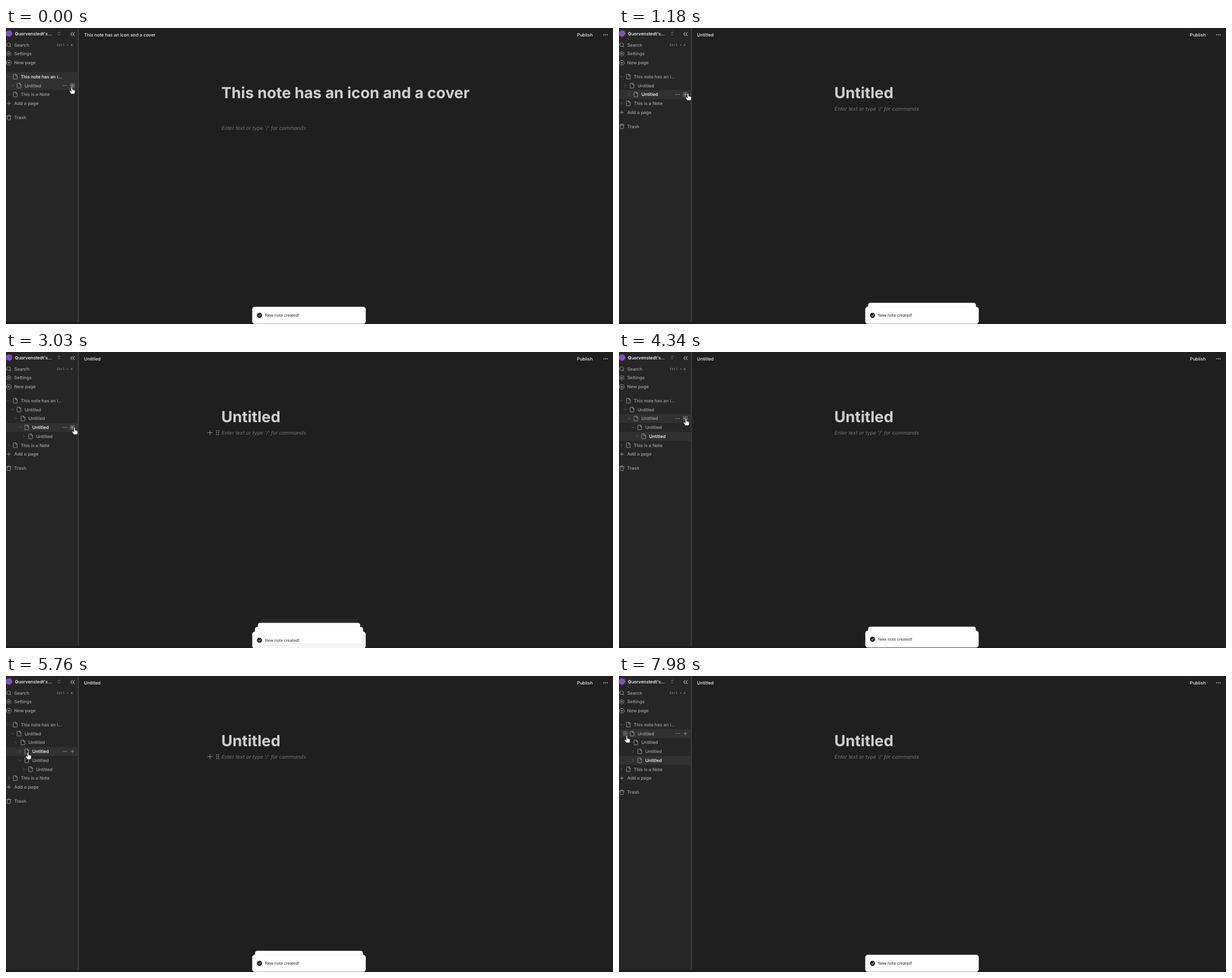
Animation of 1070x523 px, one loop 8000 ms. Source, as an HTML page:

```html
<!DOCTYPE html>
<html lang="en">
<head>
<meta charset="utf-8">
<title>Nested notes</title>
<style>
html, body { margin: 0; width: 100%; height: 100%; overflow: hidden; background: #1f1f1f; }
svg { display: block; width: 1070px; height: 523px; }
text { font: 500 7.875px Inter, sans-serif; font-optical-sizing: none; text-rendering: geometricPrecision; white-space: pre; }
.title { font-size: 27px; font-weight: 700; }
.hint { font-size: 9px; font-weight: 400; font-style: italic; }
.toast { font: 400 7.05px "Noto Sans", sans-serif; }
.key { font: 500 5.9px "Liberation Mono", monospace; }
</style>
</head>
<body>
<svg id="stage" viewBox="0 0 1070 523"></svg>
<script>
const LOOP = 8000, ROW = 15.75, INDENT = 6.75;
const DIM = '#a3a3a3', LIT = '#fff', FAINT = '#6e6e6e';
const NOTE = 'This note has an icon and a cover';

// Times at which the tree changes
const ADD_SECOND = 390, ADD_THIRD = 1930, ADD_FOURTH = 2990, ADD_SIBLING = 4620, COLLAPSE = 7050;

// start, page, title back, hint back
const visits = [
  [0, 'root', 0, 0],
  [650, 'second', 750, 1000],
  [2080, 'third', 2170, 2390],
  [3100, 'fourth', 3190, 3570],
  [4700, 'sibling', 4790, 5120],
  [6370, 'third', 6480, 6480]
];

// start, end
const toasts = [[-500, 3600], [90, 3950], [1640, 5530], [2740, 6800], [4320, 9000]];

// time, x, y of the fingertip
const pointer = [
  [0, 116, 104], [1000, 116, 104], [1180, 121.6, 115.5], [1430, 118.5, 116],
  [2130, 118.5, 116], [2380, 120.6, 133.3], [3570, 120.6, 133.3], [4100, 118, 117.3],
  [5520, 118, 117.3], [5760, 38.8, 134.5], [6180, 50, 147], [6730, 50, 147],
  [7020, 25, 148], [7620, 25, 148], [7980, 13.8, 105.5], [8000, 13.8, 105.5]
];

// Spans in which the block handle shows beside the editor line
const handles = [[2500, 3100], [5620, 6370], [6780, 7720]];

const gear = Array.from({ length: 60 }, (_, i) => {
  const a = i * Math.PI / 30, r = 8.7 + 1.2 * Math.cos(6 * a);
  return (12 + r * Math.sin(a)).toFixed(2) + ' ' + (12 - r * Math.cos(a)).toFixed(2);
}).join('L');

const ring = (x, y, r) => `M${x - r} ${y}a${r} ${r} 0 1 0 ${2 * r} 0a${r} ${r} 0 1 0 ${-2 * r} 0`;

// Outlines on a 24 unit grid
const icons = {
  file: 'M14.5 2H6a2 2 0 0 0-2 2v16a2 2 0 0 0 2 2h12a2 2 0 0 0 2-2V7.5zM14 2v6h6',
  search: ring(11, 11, 8) + 'M21 21l-4.3-4.3',
  gear: `M${gear}z` + ring(12, 12, 3),
  newPage: ring(12, 12, 10) + 'M8 12h8M12 8v8',
  plus: 'M5 12h14M12 5v14',
  trash: 'M3 6h18M19 6v14q0 2-2 2H7q-2 0-2-2V6M8 6V4q0-2 2-2h4q2 0 2 2v2',
  right: 'M9 18l6-6-6-6',
  down: 'M6 9l6 6 6-6',
  upDown: 'M7 15l5 5 5-5M7 9l5-5 5 5',
  back: 'M11 17l-5-5 5-5M18 17l-5-5 5-5',
  more: [5, 12, 19].map(x => ring(x, 12, 1)).join('')
};

const icon = (name, x, y, size = 10.125, color = DIM) =>
  `<path d="${icons[name]}" transform="translate(${x - size / 2} ${y - size / 2}) scale(${size / 24})" ` +
  `fill="none" stroke="${color}" stroke-width="2" stroke-linecap="round" stroke-linejoin="round"/>`;

const rect = (x, y, w, h, fill, r = 0) =>
  `<rect x="${x}" y="${y}" width="${w}" height="${h}" rx="${r}" fill="${fill}"/>`;

const text = (str, x, y, color = DIM, cls = '') =>
  `<text x="${x}" y="${y}" fill="${color}" class="${cls}">${str}</text>`;

const clamp = v => Math.min(1, Math.max(0, v));

// cubic-bezier(.25, .1, .25, 1)
function ease(p) {
  if (p <= 0 || p >= 1) return clamp(p);
  let lo = 0, hi = 1, s;
  for (let i = 0; i < 18; i++) {
    s = (lo + hi) / 2;
    const x = .75 * s * (1 - s) + s ** 3;
    if (x < p) lo = s; else hi = s;
  }
  return .3 * s * (1 - s) ** 2 + 3 * s * s * (1 - s) + s ** 3;
}

function pointerAt(t) {
  const i = pointer.findIndex(k => k[0] > t);
  const [t0, x0, y0] = pointer[i - 1], [t1, x1, y1] = pointer[i];
  const p = (t - t0) / (t1 - t0), s = p * (2 - p);
  return [x0 + (x1 - x0) * s, y0 + (y1 - y0) * s];
}

// Visible tree rows: id, level, label, open
function treeAt(t) {
  const fourth = t >= ADD_FOURTH && t < COLLAPSE;
  return [
    ['root', 0, 'This note has an i…', true],
    ['first', 1, 'Untitled', t >= ADD_SECOND],
    t >= ADD_SECOND && ['second', 2, 'Untitled', t >= ADD_THIRD],
    t >= ADD_SIBLING && ['sibling', 3, 'Untitled', false],
    t >= ADD_THIRD && ['third', 3, 'Untitled', fourth],
    fourth && ['fourth', 4, 'Untitled', false],
    ['other', 0, 'This is a Note', false]
  ].filter(Boolean);
}

function treeRow([id, level, label, open], y, active, [px, py]) {
  const dx = level * INDENT, arrowX = 4.5 + dx;
  const on = id === active, hover = Math.abs(py - y) <= ROW / 2;
  const button = x => hover && Math.abs(px - x) < 5 ? rect(x - 4.5, y - 4.5, 9, 9, '#525252', 1.5) : '';
  let out = on || hover ? rect(0, y - ROW / 2, 126.5, ROW, '#313131') : '';
  out += button(arrowX) + icon(open ? 'down' : 'right', arrowX, y, 9, FAINT);
  out += icon('file', 16.3 + dx, y) + text(label, 25.9 + dx, y + 2.86, on ? LIT : DIM);
  if (hover) out += icon('more', 103.5, y, 9.6) + button(117) + icon('plus', 117, y, 9);
  return out;
}

function sidebar(t, active, tip) {
  let out = rect(0, 0, 128.5, 523, '#262626');
  out += '<circle cx="5.4" cy="9.8" r="5.7" fill="#7d50bd"/>';
  out += text('Quorvenstedt\'s…', 15.6, 12.6, LIT);
  out += icon('upDown', 93.7, 9.8, 9) + icon('back', 117.3, 10.8, 13.5);
  [['search', 'Search', 30], ['gear', 'Settings', 45.6], ['newPage', 'New page', 61.4]]
    .forEach(([name, label, y]) => out += icon(name, 5, y) + text(label, 14.5, y + 2.86));
  out += text('Ctrl + K', 89.4, 32, DIM, 'key');
  let y = 86;
  for (const row of treeAt(t)) {
    out += treeRow(row, y, active, tip);
    y += ROW;
  }
  out += icon('plus', 5, y) + text('Add a page', 14.5, y + 2.86);
  out += icon('trash', 5, y + 24.75) + text('Trash', 14.5, y + 27.6);
  return out + rect(126.4, 0, 2.2, 523, '#3b3b3b');
}

function page(t, [start, id, titleAt, hintAt]) {
  if (t < titleAt) return '';
  const root = id === 'root', name = root ? NOTE : 'Untitled';
  let out = text(name, 137.6, 14.8, '#f0f0f0') + text('Publish', 1006.6, 14.8, '#f0f0f0');
  out += icon('more', 1057, 12, 10.125, '#f0f0f0');
  out += text(name, 379.5, 124.2, '#cfcfcf', 'title');
  if (t >= hintAt) out += text("Enter text or type '/' for commands", 380, root ? 179.6 : 145.9, '#747474', 'hint');
  if (handles.some(([a, b]) => t >= a && t < b)) {
    out += '<path d="M355 142.5h9M359.5 138v9" stroke="#8c8c8c" fill="none"/>';
    for (let i = 0; i < 6; i++)
      out += `<circle cx="${371.3 + i % 2 * 3.4}" cy="${139.3 + (i >> 1) * 3.2}" r="1" fill="#8c8c8c"/>`;
  }
  return out;
}

function toastStack(t) {
  return toasts.map(([start, end], i) => {
    const shown = ease((t - start) / 400);
    const depth = toasts.slice(i + 1).reduce((sum, next) => sum + ease((t - next[0]) / 400), 0);
    const alpha = shown * (1 - ease((t - end) / 220)) * clamp(3 - depth);
    if (alpha <= 0) return '';
    const y = 507.6 + 30 * (1 - shown) - 7.875 * depth;
    return `<g opacity="${alpha}" transform="translate(534.1 ${y}) scale(${1 - .05 * depth})">
      <rect x="-99.9" y="-14.8" width="199.8" height="29.6" rx="4.3" fill="#fff" stroke="#f0f0f0" stroke-width=".4"/>
      <g opacity="${clamp(1 - depth)}"><circle cx="-87.3" cy=".2" r="4.5" fill="#171717"/>
      <path d="M-89.2 .4l1.4 1.5 2.5-3.4" fill="none" stroke="#fff" stroke-width=".9"/>
      ${text('New note created!', -77.6, 2.8, '#171717', 'toast')}</g></g>`;
  }).join('');
}

const hand = ([x, y]) => `<g transform="translate(${x} ${y})" stroke="#161616" stroke-linejoin="round">
  <path d="M-1.1 1.1a1.1 1.1 0 0 1 2.2 0V4.6q1.1-.6 1.7 .4 1.2-.4 1.7 .5 1.3-.2 1.3 1.1V9q0 2-1.2 3.6H-1.2Q-2.5 10.4-4 8.2q-.6-1.1 .4-1.5 1-.3 1.8 .6l.7 .8z" fill="#fff" stroke-width=".7"/>
  <path d="M1.1 7V4.6M2.8 7.2V5M4.5 7.4V5.5" fill="none" stroke-width=".4"/></g>`;

const stage = document.getElementById('stage');
const begin = performance.now();
let last = '';

function draw() {
  const t = Math.max(0, performance.now() - begin) % LOOP;
  const visit = visits.filter(v => v[0] <= t).pop(), tip = pointerAt(t);
  const scene = rect(0, 0, 1070, 523, '#1f1f1f') + sidebar(t, visit[1], tip) + page(t, visit) +
    rect(0, 519.5, 1070, 3.5, '#21191b') + toastStack(t) + hand(tip);
  if (scene !== last) stage.innerHTML = last = scene;
  requestAnimationFrame(draw);
}
draw();
</script>
</body>
</html>
```
